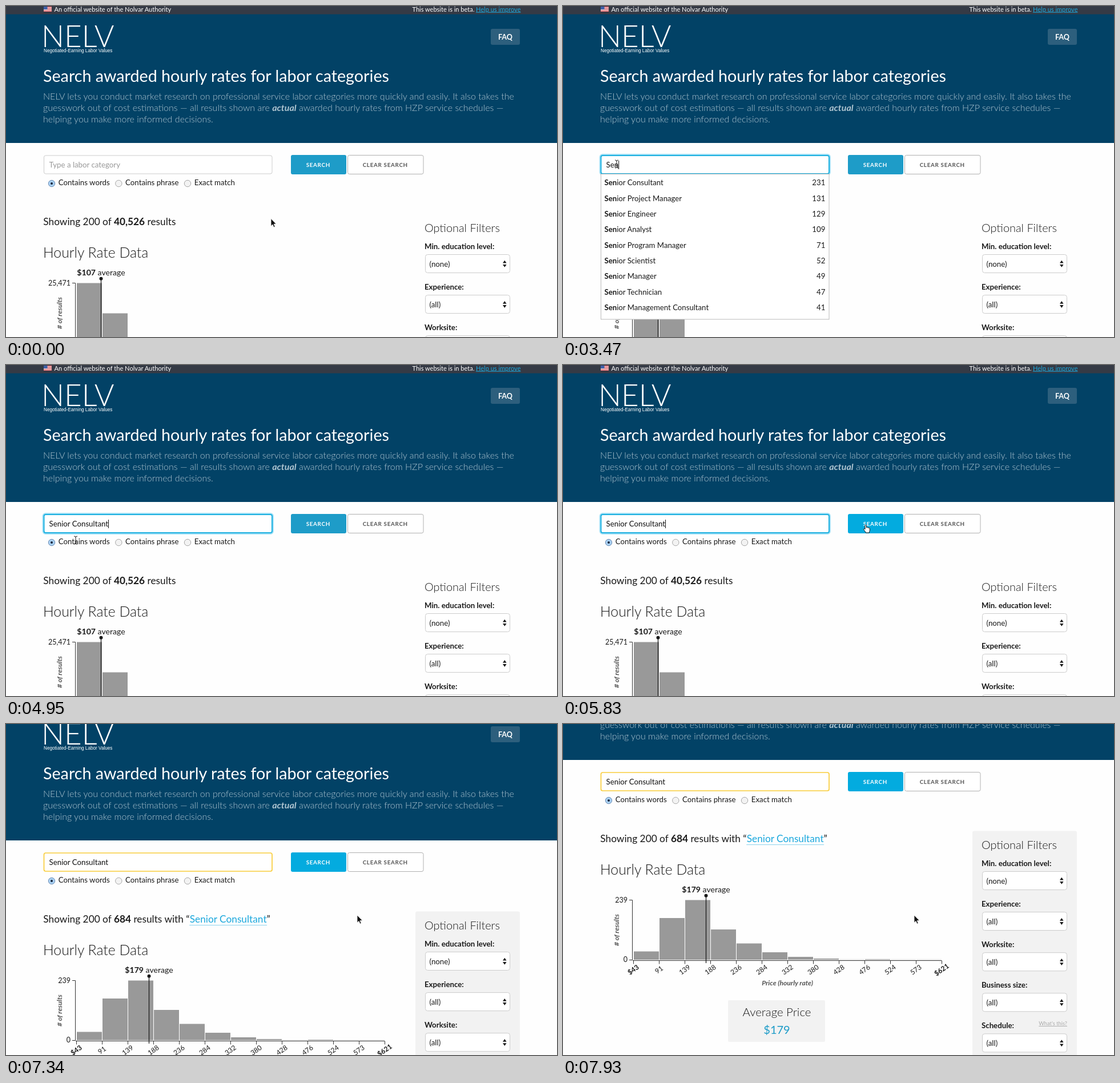
These frames come from a looping animation (965 px wide and 580 px high, 8000 ms). An HTML page:

```html
<!DOCTYPE html>
<html lang="en">
<head>
<meta charset="utf-8">
<title>Hourly rate search</title>
<style>
  html, body { margin: 0; width: 100%; height: 100%; overflow: hidden; background: #fefefe; }
  svg { display: block; font-family: Lato, sans-serif; fill: #1a1a1a; }
  .light { font-weight: 300; }
  .bold { font-weight: 700; }
  .caps { font-weight: 700; letter-spacing: .7px; }
  .axis { font-weight: 700; font-style: italic; fill: #555; }
  .mid { text-anchor: middle; }
  .end { text-anchor: end; }
  .rule { stroke: #333; fill: none; }
  .under { text-decoration: underline; }
</style>
</head>
<body>
<svg id="stage" width="965" height="580" viewBox="0 0 965 580"></svg>
<script>
const LOOP = 8000;
const BAR_BASE = 590;
const ALL_BARS = [104.5, 51.5, 7.5, 2, .7, .4, .3, .2, .2, .2, .2, .2];
const MATCH_BARS = [14.5, 73, 104.5, 53, 28.5, 13, 5, 2, .3, 1, .3, .3];
const PRICES = ['$43', 91, 139, 188, 236, 284, 332, 380, 428, 476, 524, 573, '$621'];
const SUGGESTIONS = [
  ['Consultant', 231], ['Project Manager', 131], ['Engineer', 129],
  ['Analyst', 109], ['Program Manager', 71], ['Scientist', 52],
  ['Manager', 49], ['Technician', 47], ['Management Consultant', 41]
];
const FILTERS = ['Min. education level:', 'Experience:', 'Worksite:', 'Business size:', 'Schedule:'];
const ROW_TOP = 296.3, ROW_HEIGHT = 27.35;

const text = (x, y, size, content, cls = '', attrs = '') =>
  `<text x="${x}" y="${y}" font-size="${size}" class="${cls}" ${attrs}>${content}</text>`;
const rect = (x, y, w, h, fill, attrs = '') =>
  `<rect x="${x}" y="${y}" width="${w}" height="${h}" fill="${fill}" ${attrs}/>`;
const bold = s => `<tspan font-weight="700">${s}</tspan>`;

function flag() {
  let out = rect(66, 1, 14, 9, '#f4f0f0');
  for (let y = 1; y < 10; y += 2) out += rect(66, y, 14, 1, '#d8414a');
  return out + rect(66, 1, 6.5, 5, '#3d5fa8');
}

function header() {
  const white = 'fill="#fff"', pale = 'fill="#b0c5d1"';
  return rect(0, 0, 965, 15, '#353a45') + rect(0, 14.5, 965, 225.5, '#024266') + flag() +
    text(84.5, 9.5, 11.1, 'An official website of the Nolvar Authority', '', white) +
    text(711.5, 9.5, 11, 'This website is in beta. <tspan class="under" fill="#1ba8dd">Help us improve</tspan>', '', white) +
    text(62, 72, 53, 'NELV', 'light', white) +
    text(66, 80.8, 8.2, 'Negotiated-Earning Labor Values', '', white + ' font-family="Liberation Sans, sans-serif"') +
    rect(849, 40, 51, 28, '#2d5f7d', 'rx="3"') +
    text(874.5, 58.5, 12.6, 'FAQ', 'bold mid', white) +
    text(65, 132.5, 28.7, 'Search awarded hourly rates for labor categories', '', white) +
    text(65, 164, 16.05, 'NELV lets you conduct market research on professional service labor categories more quickly and easily. It also takes the', 'light', pale) +
    text(65, 184, 16.05, 'guesswork out of cost estimations — all results shown are <tspan font-weight="700" font-style="italic">actual</tspan> awarded hourly rates from HZP service schedules —', 'light', pale) +
    text(65, 204, 16.05, 'helping you make more informed decisions.', 'light', pale);
}

function radio(x, label, checked) {
  return `<circle cx="${x}" cy="311" r="5.7" fill="${checked ? '#a9d0f2' : '#f3f3f3'}" stroke="${checked ? '#6f8fb5' : '#a8a8a8'}"/>` +
    (checked ? `<circle cx="${x}" cy="311" r="2" fill="#16263c"/>` : '') +
    text(x + 11.8, 314.2, 13.25, label);
}

function searchForm() {
  return rect(65.5, 261, 401.5, 34, 'none', 'id="glow" rx="4" stroke="#a5e2f7" stroke-width="4"') +
    rect(66.5, 262, 399.5, 32, '#fff', 'id="input" rx="3"') +
    text(75.6, 283, 13.25, '', '', 'id="typed"') +
    rect(0, 271, 1, 15, '#111', 'id="caret"') +
    rect(499, 261, 97, 34, '#1e9cc8', 'id="search" rx="3"') +
    text(525.7, 282, 9.8, 'SEARCH', 'caps', 'fill="#fff"') +
    rect(598.5, 261.5, 132.5, 33, '#fff', 'rx="3" stroke="#b0b0b0"') +
    text(624.7, 282, 9.8, 'CLEAR SEARCH', 'caps', 'fill="#555"') +
    radio(80, 'Contains words', true) + radio(197.3, 'Contains phrase') + radio(318, 'Exact match');
}

function filters() {
  let out = rect(717, 364.5, 183, 500, '#f2f2f2', 'id="panel" rx="3"') +
    text(733, 396, 19.9, 'Optional Filters', 'light');
  FILTERS.forEach((label, i) => {
    const y = 71.1 * i;
    out += text(733, 425.5 + y, 13.25, label, 'bold') +
      rect(734.5, 435.5 + y, 148, 32, '#fff', 'rx="4" stroke="#ccc"') +
      text(741.5, 457 + y, 13.25, i ? '(all)' : '(none)') +
      `<path transform="translate(873.3 ${451.8 + y})" d="M-3.3-1.2 0-6 3.3-1.2ZM-3.3 1.2 0 6 3.3 1.2Z"/>`;
  });
  return out + text(883, 705, 9.3, "What's this?", 'end under', 'fill="#aaa"');
}

function chart() {
  let out = '';
  MATCH_BARS.forEach((h, i) => out += rect(124 + 45 * i, 0, 44, 0, '#999', 'data-bar'));
  out += '<path class="rule" d="M116 485.5H121.5V590.5H116M122 591.5H663"/>';
  PRICES.forEach((price, i) => {
    const x = 123 + 45 * i, edge = i % 12 === 0;
    out += `<path class="rule" d="M${x + .5} 591.5v6"/>` +
      text(0, 4.3, 12, price, edge ? 'bold mid' : 'mid', `transform="translate(${x} 607.5) rotate(-35)"`);
  });
  return '<g id="chart">' + out +
    text(113, 489.5, 12.5, '', 'end', 'id="peak"') + text(113, 594, 12.5, '0', 'end') +
    text(0, 0, 12.1, '# of results', 'axis mid', 'transform="translate(97.7 538) rotate(-90)"') +
    text(393, 634.5, 12.1, 'Price (hourly rate)', 'axis mid') +
    '<g id="average"><path d="M0 477.5V596" stroke="#111" stroke-width="1.2"/><circle cy="477.7" r="3"/>' +
    text(0, 472, 14.1, '', 'mid', 'id="averageLabel"') + '</g></g>';
}

function results() {
  return text(65.3, 384.3, 17.3, '', '', 'id="summary"') +
    '<path id="underline" stroke="#1ba8dd" stroke-dasharray="1 1"/>' +
    text(65, 441, 24.8, 'Hourly Rate Data', 'light') + chart() +
    rect(289, 661, 170, 73, '#f2f2f2', 'rx="2"') +
    text(374.5, 689, 20.4, 'Average Price', 'light mid') +
    text(374.5, 720, 20, '$179', 'mid', 'fill="#1e9cc8"');
}

function dropdown() {
  let out = rect(66.5, 294.5, 399.5, 254.5, '#fff', 'stroke="#bbb"') +
    rect(67, 0, 398.5, ROW_HEIGHT, '#f0f0f0', 'id="hover"');
  SUGGESTIONS.forEach(([role, count], i) => {
    const y = ROW_TOP + 18 + ROW_HEIGHT * i;
    out += text(72.5, y, 13.2, bold('Sen') + 'ior ' + role) + text(459.3, y, 13.2, count, 'end');
  });
  return `<g id="dropdown">${out}</g>`;
}

const pointers = `
  <path id="arrow" d="M0 0V13.2L3 10.4 5.1 15.2 7.2 14.3 5.2 9.6H9.3Z" fill="#111" stroke="#fff" stroke-width=".8"/>
  <path id="beam" d="M-3-7Q0-7 0-5 0-7 3-7M0-5V5M-3 7Q0 7 0 5 0 7 3 7M-1.5 2.5H1.5" fill="none" stroke="#222"/>
  <path id="hand" d="M3 1.5c0-2 2.4-2 2.4 0V5c.2-1 2-.9 2.2.3.3-.8 1.9-.6 2.1.6.4-.7 1.6-.3 1.6 1V10c0 1-1 2-1 4H4.3C4 12 1.5 10 .5 8.2 0 7 1.4 6.4 2.3 7.4L3 8Z" fill="#fff" stroke="#111"/>`;

document.getElementById('stage').innerHTML =
  `<g id="page">${header()}${filters()}${results()}${searchForm()}${dropdown()}</g><g id="pointer">${pointers}</g>`;

const el = id => document.getElementById(id);
const bars = document.querySelectorAll('[data-bar]');
const show = (id, on) => el(id).setAttribute('display', on ? 'inline' : 'none');
const set = (id, attrs) => { for (const k in attrs) el(id).setAttribute(k, attrs[k]); };
const mix = (a, b, p) => a + (b - a) * p;

// Each track holds [time, ...values]; a value stays until the next time.
const POINTER = [
  [0, 464, 372.5, 'arrow'], [900, 445, 374, 'arrow'], [1050, 310, 373, 'arrow'],
  [1230, 108, 342, 'arrow'], [1380, 95, 290, 'arrow'], [1530, 93, 276, 'arrow'],
  [1680, 94, 277, 'beam'], [3620, 97, 300, 'arrow'], [3770, 106, 335, 'arrow'],
  [3920, 114, 376, 'arrow'], [4070, 117, 384, 'arrow'], [4210, 118, 358, 'arrow'],
  [4360, 119, 328, 'arrow'], [4510, 119, 300, 'arrow'], [4660, 122, 307, 'beam'],
  [5250, 155, 312, 'arrow'], [5400, 290, 306, 'arrow'], [5550, 430, 296, 'arrow'],
  [5700, 518, 283, 'hand'], [5830, 526, 280, 'hand'], [6720, 566, 300, 'hand'],
  [6880, 602, 327, 'arrow'], [7040, 615, 335, 'arrow']
];
const TYPED = [[0, ''], [2430, 'S'], [2580, 'Se'], [2730, 'Sen'], [4950, 'Senior Consultant']];
const SCROLL = [[0, 0], [7340, 36], [7510, 88.5], [7720, 140], [7930, 177]];
const RELOAD = [[0, 0, 1], [6130, 0, .6], [6310, .19, .7], [6520, .92, .85], [6720, 1, 1]];
const at = (track, t) => track.findLast(entry => entry[0] <= t).slice(1);

function setContent(id, markup) {
  const node = el(id);
  if (node.dataset.markup === markup) return;
  node.dataset.markup = markup;
  node.innerHTML = markup;
}

function drawSummary(loaded) {
  setContent('summary', loaded
    ? `Showing 200 of ${bold('684')} results with “<tspan id="term" fill="#1ba8dd">Senior Consultant</tspan>”`
    : `Showing 200 of ${bold('40,526')} results`);
  show('underline', loaded);
  if (!loaded) return;
  const term = el('term');
  const left = term.getStartPositionOfChar(0).x;
  set('underline', { d: `M${left} 388.5h${term.getComputedTextLength()}` });
}

function draw(t) {
  const [px, py, shape] = at(POINTER, t);
  const [typed] = at(TYPED, t);
  const [progress, opacity] = at(RELOAD, t);
  const focused = t >= 1830 && t < 5980;
  const submitted = t >= 5980;
  const loaded = t >= 6310;

  set('page', { transform: `translate(0 ${-at(SCROLL, t)[0]})` });
  set('pointer', { transform: `translate(${px} ${py})` });
  for (const id of ['arrow', 'beam', 'hand']) show(id, id === shape);

  show('glow', focused);
  set('input', {
    stroke: focused ? '#1cb0e0' : submitted ? '#f9cd3b' : '#ccc',
    'stroke-width': focused ? 2 : submitted ? 1.7 : 1
  });
  setContent('typed', typed || 'Type a labor category');
  set('typed', { fill: typed ? '#111' : '#999' });
  show('caret', focused);
  set('caret', { x: 75.6 + (typed ? el('typed').getComputedTextLength() : 0) });
  set('search', { fill: t >= 5700 ? '#03abdf' : '#1e9cc8' });

  const row = Math.floor((py - ROW_TOP) / ROW_HEIGHT);
  show('dropdown', t >= 2880 && t < 4950);
  show('hover', row >= 0);
  set('hover', { y: ROW_TOP + ROW_HEIGHT * row });

  drawSummary(loaded);
  setContent('peak', loaded ? '239' : '25,471');
  setContent('averageLabel', bold(loaded ? '$179' : '$107') + ' average');
  set('average', { transform: `translate(${mix(166.5, 250.5, progress)} 0)` });
  set('chart', { opacity });
  bars.forEach((bar, i) => {
    const height = mix(ALL_BARS[i], MATCH_BARS[i], progress);
    bar.setAttribute('y', BAR_BASE - height);
    bar.setAttribute('height', height);
  });
  show('panel', t >= 7340);
}

function frame() {
  draw(performance.now() % LOOP);
  requestAnimationFrame(frame);
}
frame();
</script>
</body>
</html>
```
